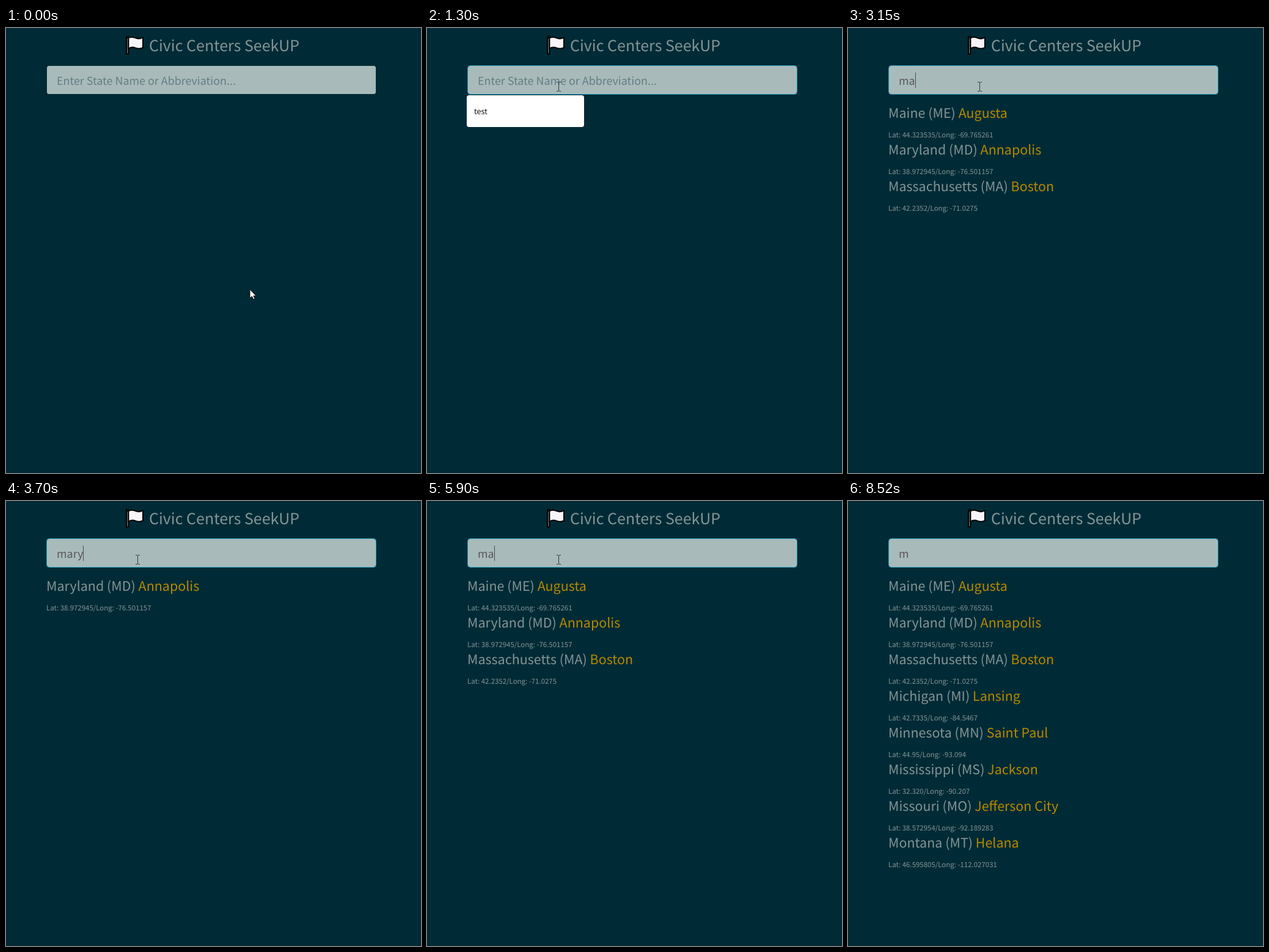
An HTML page for the animation above (8640 ms loop, 679x728 px).

```html
<!DOCTYPE html>
<html lang="en">
<head>
<meta charset="utf-8">
<title>Civic Centers SeekUP</title>
<style>
  html, body { margin: 0; width: 100%; height: 100%; overflow: hidden; background: #002b36; }
  svg { display: block; width: 679px; height: 728px; }
  text { font-family: "Noto Sans CJK JP", "Noto Sans CJK SC", "Noto Sans CJK KR", "Noto Sans CJK TC", "Noto Sans", sans-serif; fill: #839496; text-rendering: geometricPrecision; }
  .title { font-size: 25px; }
  .field { font-size: 17.9px; }
  .hint { fill: #647d83; }
  .typed { fill: #5a565c; }
  .state { font-size: 21.48px; }
  .state tspan { fill: #b58900; }
  .coords { font-size: 11.46px; }
  .option { font-size: 12.5px; fill: #111; }
</style>
</head>
<body>
<svg viewBox="0 0 679 728">
  <rect width="679" height="728" fill="#002b36"/>
  <g stroke="#000" stroke-width="2" stroke-linejoin="round">
    <path d="M197 14.5h3.4v28h-3.4z" fill="#6d7274"/>
    <path d="M200.4 16.5C204 14.3 208 14.6 212 16.4S220 17.6 224 15.4V32.2C220 34.4 216 34.2 212 32.6S204 31.4 200.4 33.8Z" fill="#f7f5f7"/>
    <circle cx="198.7" cy="14.8" r="1.4" fill="#f7f5f7"/>
  </g>
  <text class="title" x="234" y="38">Civic Centers SeekUP</text>

  <rect x="67" y="62" width="538" height="46" rx="3.5" fill="#a8bbba"/>
  <rect id="ring" x="66.5" y="61.5" width="539" height="47" rx="4" fill="none" stroke="#1c93b4"/>
  <rect id="selection" x="83" y="73" height="25" fill="#0078d7"/>
  <text id="hint" class="field hint" x="83" y="93">Enter State Name or Abbreviation...</text>
  <text id="typed" class="field typed" x="83" y="93"></text>
  <rect id="caret" y="73" width="1" height="25" fill="#4a4a50"/>

  <g id="results"></g>

  <g id="dropdown">
    <rect x="65" y="110" width="192" height="52" rx="4" fill="#fff"/>
    <text class="option" x="77" y="141">test</text>
  </g>

  <path id="arrow" d="M0 .5V15.2L3.4 12 5.8 17.2 8.2 16.2 5.9 11.2H10.4Z" fill="#fff" stroke="#000" stroke-width="1"/>
  <path id="beam" d="M-3 -7.5H-1L.5 -6.5 2 -7.5H4M.5 -6.5V6.5M-3 7.5H-1L.5 6.5 2 7.5H4" fill="none" stroke="#303638"/>
</svg>
<script>
const LOOP = 8640;
const $ = id => document.getElementById(id);

const states = [
  ["Maine", "ME", "Augusta", "44.323535", "-69.765261"],
  ["Maryland", "MD", "Annapolis", "38.972945", "-76.501157"],
  ["Massachusetts", "MA", "Boston", "42.2352", "-71.0275"],
  ["Michigan", "MI", "Lansing", "42.7335", "-84.5467"],
  ["Minnesota", "MN", "Saint Paul", "44.95", "-93.094"],
  ["Mississippi", "MS", "Jackson", "32.320", "-90.207"],
  ["Missouri", "MO", "Jefferson City", "38.572954", "-92.189283"],
  ["Montana", "MT", "Helana", "46.595805", "-112.027031"]
];

// Each track is a list of [start time, value]; values hold until the next step.
const typing = [[0, ""], [1850, "m"], [3150, "ma"], [3270, "mar"], [3700, "mary"],
  [5350, "mar"], [5450, "ma"], [6220, "m"]];
const blink = [[0, 0], [870, 1], [1300, 0], [1850, 1], [2400, 0], [2930, 1], [4250, 0],
  [5130, 1], [5350, 0], [5900, 1], [6440, 0], [6890, 1], [7420, 0], [7974, 1], [8520, 0]];
const focus = [[0, 0], [870, 0.6], [970, 1]];
const dropdown = [[0, 0], [870, 1], [1850, 0]];
const selected = [[0, 0], [4680, 1], [5130, 0]];
const pointer = [
  [0, ["arrow", 399, 427]], [100, ["arrow", 396, 418]], [210, ["arrow", 376, 368]],
  [320, ["arrow", 330, 280]], [430, ["arrow", 275, 190]], [540, ["arrow", 236, 128]],
  [650, ["beam", 220, 101]], [760, ["beam", 215, 96]],
  [7650, ["beam", 290, 76]], [7758, ["beam", 420, 73]], [7866, ["arrow", 515, 180]],
  [7974, ["arrow", 566, 400]], [8082, ["arrow", 560, 705]], [8190, ["none", 0, 0]]
];
// Caret columns by number of typed letters.
const caretX = [83, 100, 110, 116, 126];

const at = (track, t) => track.findLast(step => step[0] <= t)[1];
const show = (el, on) => el.setAttribute("visibility", on ? "visible" : "hidden");

function listStates(query) {
  const hits = query ? states.filter(s => s[0].toLowerCase().startsWith(query)) : [];
  $("results").innerHTML = hits.map(([name, code, city, lat, long], i) => `
    <text class="state" x="66" y="${147 + 60 * i}">${name} (${code}) <tspan>${city}</tspan></text>
    <text class="coords" x="66" y="${179 + 60 * i}">Lat: ${lat}/Long: ${long}</text>`).join("");
}

let shown = null;
function draw(t) {
  const text = at(typing, t);
  if (text !== shown) {
    shown = text;
    $("typed").textContent = text;
    listStates(text);
  }
  show($("hint"), !text);
  show($("dropdown"), at(dropdown, t));
  $("ring").setAttribute("opacity", at(focus, t));

  const marked = at(selected, t);
  $("selection").setAttribute("width", caretX[text.length] - 83);
  show($("selection"), marked);
  $("typed").style.fill = marked ? "#fff" : "";

  $("caret").setAttribute("x", caretX[text.length]);
  show($("caret"), at(blink, t));

  const [kind, x, y] = at(pointer, t);
  for (const id of ["arrow", "beam"]) {
    show($(id), id === kind);
    $(id).setAttribute("transform", `translate(${x} ${y})`);
  }
}

const start = performance.now();
function tick() {
  draw((performance.now() - start) % LOOP);
  requestAnimationFrame(tick);
}
tick();
</script>
</body>
</html>
```
